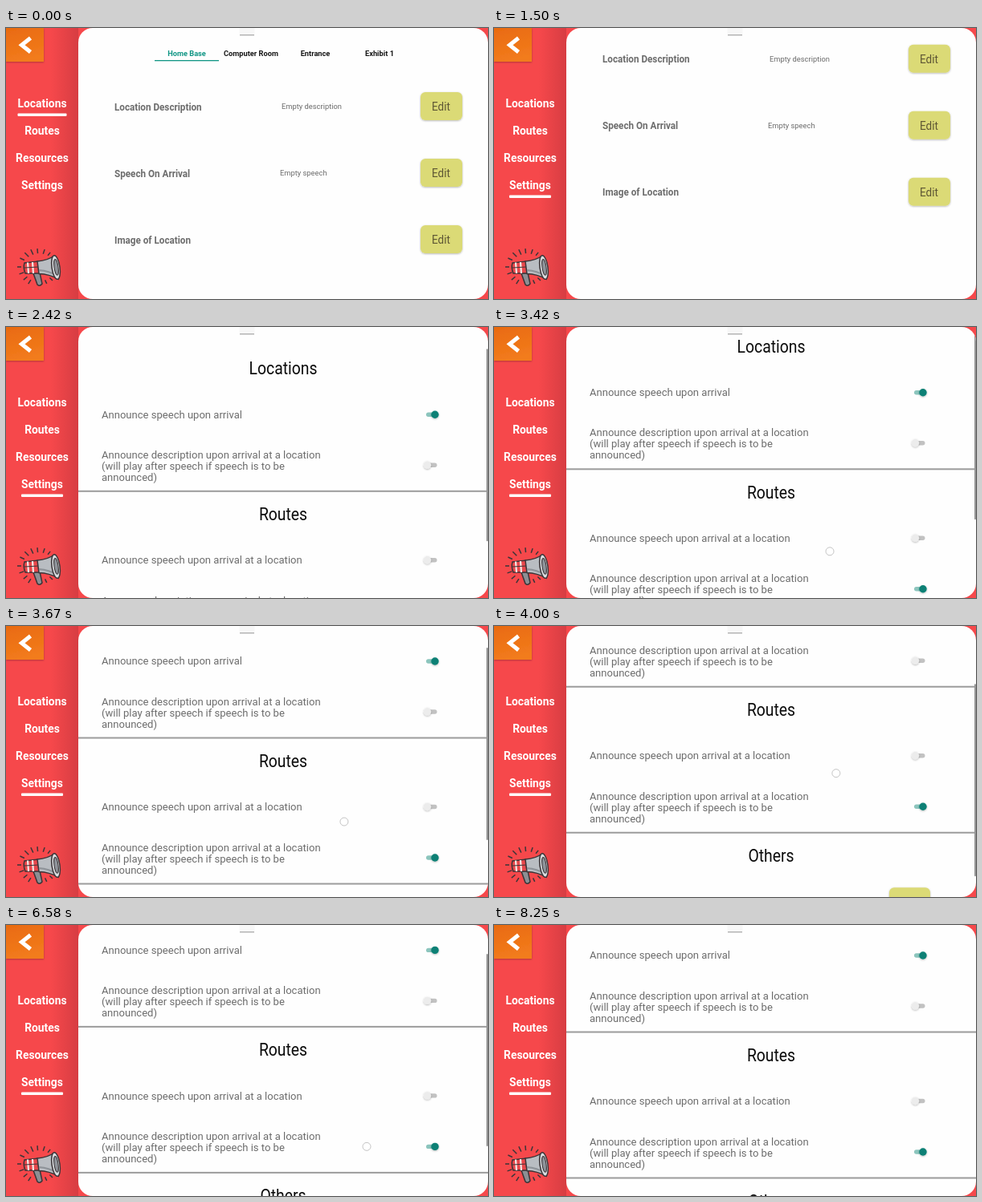
An HTML page for the animation above (8580 ms loop, 600 by 338 pixels).

```html
<!DOCTYPE html>
<html lang="en">
<head>
<meta charset="utf-8">
<title>Settings walkthrough</title>
<style>
  html, body { margin: 0; height: 100%; overflow: hidden; background: #f6484b; }
  svg { display: block; width: 100vw; height: 100vh; font-family: Roboto, sans-serif; }
  .bold { font-weight: 700; }
</style>
</head>
<body>
<svg id="stage" viewBox="0 0 600 338" preserveAspectRatio="none"></svg>
<script>
const LOOP = 8580, PAGE = 338, FPS = 12;
const GREY = '#6c6c6c', LIME = '#dbda76';

// Markup helpers
const rect = (x, y, w, h, fill, r = 0, extra = '') =>
  `<rect x="${x}" y="${y}" width="${w}" height="${h}" rx="${r}" fill="${fill}" ${extra}/>`;
const path = (d, stroke, width, fill = 'none') =>
  `<path d="${d}" stroke="${stroke}" stroke-width="${width}" fill="${fill}"/>`;
const text = (x, y, size, fill, str, extra = '') =>
  `<text x="${x}" y="${y}" font-size="${size}" fill="${fill}" ${extra}>${str}</text>`;
const narrow = (x, y, size, fill, str, extra = '') =>
  text(0, 0, size, fill, str, `transform="translate(${x} ${y}) scale(.88 1)" ${extra}`);
const mid = 'text-anchor="middle"', bold = 'class="bold"';
const lifted = 'filter="url(#lift)"';
const page = (index, body, id = '') =>
  `<g id="${id}" transform="translate(0 ${index * PAGE})">${body}</g>`;

function sidebar() {
  const labels = ['Locations', 'Routes', 'Resources', 'Settings'];
  return rect(0, 0, 600, 338, '#f6484b') + rect(0, 0, 90, 338, 'url(#shade)') +
    rect(0, 0, 47, 42, 'url(#orange)', 0, lifted) +
    path('M30.5 12.5 19.5 21.3 30.5 30', '#fff', 5) +
    labels.map((s, i) => text(45, 98.5 + 34 * i, 13.85, '#fff', s, mid + bold)).join('') +
    rect(14.5, 106.6, 61, 3.4, '#fff', 1, 'id="underline"') + megaphone();
}

function megaphone() {
  const ink = '#3b3538';
  const rays = [[-155, 20, 26], [-135, 18, 25], [-115, 17, 24], [-95, 17, 23], [-72, 17, 23], [-52, 18, 23],
    [180, 22, 27], [160, 20, 26], [140, 19, 25], [122, 19, 25], [45, 19, 24], [65, 18, 23]];
  const ray = ([deg, from, to]) => {
    const c = Math.cos(deg * Math.PI / 180), s = Math.sin(deg * Math.PI / 180);
    return `M${41 + from * c} ${298 + from * s}L${41 + to * c} ${298 + to * s}`;
  };
  return path(rays.map(ray).join(''), ink, 1.5) +
    path('M34 306 39 320Q42 323 45 319L42 305Z', ink, 1.5, '#8c8f94') +
    path('M23 293Q21 299 24 306L41 306 40 291Z', ink, 1.5, '#e8484c') +
    path('M27 292.5 28 306M33 292 34 306', '#f3e9e6', 2.2) +
    path('M23 299 40 298', ink, 1) +
    path('M39 291Q52 290 60 284L65 313Q54 307 41 306.500Z', ink, 1.5, '#b9bdc2') +
    path('M41 302Q54 303 63 309', '#8d9298', 2) +
    `<g transform="rotate(-8 62 298.500)" stroke="${ink}" stroke-width="1.500">
      <ellipse cx="62" cy="298.500" rx="5" ry="15" fill="#d9dcdf"/>
      <ellipse cx="62.500" cy="298.500" rx="2.500" ry="10" fill="#8f949a" stroke-width="1"/></g>`;
}

function locations() {
  const tabs = ['Home Base', 'Computer Room', 'Entrance', 'Exhibit 1'];
  const rows = ['Location Description', 'Speech On Arrival', 'Image of Location'];
  return tabs.map((s, i) => text(225 + 80 * i, 34.5, 9.25, i ? '#161616' : '#0f9584', s, mid + bold)).join('') +
    rect(185, 40, 80, 1.3, '#0f9584') +
    rows.map((s, i) => narrow(135, 102.500 + 83 * i, 13.3, GREY, s, bold) +
      rect(516, 80 + 83 * i, 52, 35, LIME, 6, lifted) +
      narrow(541.5, 103 + 83 * i, 15.4, '#5d5634', 'Edit', mid)).join('') +
    text(343, 101, 9.35, GREY, 'Empty description') + text(341, 184, 9.35, GREY, 'Empty speech');
}

function resources() {
  const pencil = `<path fill="#fff" d="M226.500 140.500V134L242.500 118.500 248.500 124.500 233 140.500ZM244 117 247 114.500Q248.500 113.500 250 114.500L253.500 118Q254.500 119.500 253.500 121L250.500 123.500Z"/>`;
  const bin = path('M380.5 118.5H408.500M389.500 118V115.500H399.500V118', '#fff', 2.8) +
    path('M384 121.500V137Q384 139.500 386.500 139.500H402.500Q405 139.500 405 137V121.500', '#fff', 2.8) +
    path('M389.500 123V136M394.500 123V136M399.500 123V136', '#fff', 2.3);
  return rect(218.5, 108.5, 87.5, 39, LIME, 6, lifted) + pencil + narrow(268, 134.3, 17.2, '#fff', 'Edit') +
    rect(373, 108.5, 103.5, 38, '#a5354b', 6, lifted) + bin + narrow(422, 134.3, 17.2, '#fff', 'Delete') +
    rect(278, 178, 134.5, 34.5, '#03d6c6', 0, lifted) +
    narrow(288, 199.7, 12.5, '#17615d', 'Add an image locally', bold + ' letter-spacing=".65"');
}

function settings() {
  const heading = (y, s) => narrow(345, y, 22, '#0c0c0c', s, mid);
  const lines = (y, ...strs) => strs.map((s, i) => text(119, y + 14 * i, 13.05, GREY, s)).join('');
  const divider = y => rect(90, y, 510, 2, '#9c9c9c');
  const toggle = (y, i) => `<g class="toggle" transform="translate(0 ${y})">` +
    rect(523, -2.7, 13.5, 5.4, '#c2c2c2', 2.7) +
    `<circle r="8.500" fill="#000" opacity="0"/><circle r="4.700" ${lifted}/></g>`;
  const description = ['Announce description upon arrival at a location',
    '(will play after speech if speech is to be', 'announced)'];
  return '<g id="list">' + heading(32, 'Locations') + lines(86.3, 'Announce speech upon arrival') +
    lines(136.5, ...description) + divider(176.5) +
    heading(214, 'Routes') + lines(268.2, 'Announce speech upon arrival at a location') +
    lines(318.5, ...description) + divider(358.5) +
    heading(396, 'Others') + rect(492, 428, 51, 34, LIME, 6, lifted) +
    [82, 145, 263.5, 327].map(toggle).join('') + '</g>' +
    rect(598, 0, 2, 240, '#979797', 1, 'id="bar"');
}

const $ = id => document.getElementById(id);
$('stage').innerHTML = `<defs>
  <linearGradient id="shade"><stop offset=".62" stop-color="#b8323a" stop-opacity="0"/>
    <stop offset="1" stop-color="#b8323a" stop-opacity=".5"/></linearGradient>
  <linearGradient id="orange" x2=".3" y2="1"><stop stop-color="#e96a10"/><stop offset="1" stop-color="#f27b1c"/></linearGradient>
  <filter id="lift" x="-20%" y="-20%" width="140%" height="150%">
    <feDropShadow dx="0" dy=".8" stdDeviation=".9" flood-opacity=".3"/></filter>
  <clipPath id="card"><rect x="90" width="510" height="338" rx="18"/></clipPath></defs>` +
  sidebar() + rect(90, 0, 510, 338, '#fefefe', 18) +
  '<g clip-path="url(#card)"><g id="pages">' +
  page(0, locations()) + page(2, resources()) + page(3, settings(), 'settings') + '</g></g>' +
  rect(290.5, -6, 19, 15, '#f7f7f7', 3) + path('M291 8.800H309', '#a9a9a9', 1.3) +
  '<circle id="touch" r="5" fill="#fff" fill-opacity=".8" stroke="#c4c4c4"/>';

// Motion helpers
const ramp = (t, a, b) => Math.min(1, Math.max(0, (t - a) / (b - a)));
const smooth = u => u * u * (3 - 2 * u);
const easeOut = u => 1 - (1 - u) * (1 - u);
const within = (t, a, b) => t >= a && t < b;
const mix = (from, to, u) => `rgb(${from.map((v, i) => Math.round(v + (to[i] - v) * u))})`;

const toggles = [...document.querySelectorAll('.toggle')];
function setToggle(group, on, ripple) {
  const [track, halo, thumb] = group.children;
  const x = 524.5 + 9.5 * on;
  track.setAttribute('fill', mix([194, 194, 194], [140, 197, 189], on));
  halo.setAttribute('cx', x);
  halo.setAttribute('opacity', ripple * .12);
  thumb.setAttribute('cx', x);
  thumb.setAttribute('fill', mix([236, 236, 236], [10, 128, 116], on));
}

// One tap switches on at `start`, a second one switches off again
function tapTwice(group, t, start) {
  const on = smooth(ramp(t, start, start + 250)) - smooth(ramp(t, start + 600, start + 900));
  const pulse = at => Math.sin(Math.PI * ramp(t, at, at + 400));
  setToggle(group, on, Math.max(pulse(start), pulse(start + 500)));
}

function touchAt(t, drag, pull) {
  if (within(t, 3245, 4165)) return [418 + 8 * drag, 280 - 98 * drag];
  if (within(t, 5080, 5330) || within(t, 5660, 5830)) return [527, 165];
  if (within(t, 6330, 6665)) return [449, 223 + 60 * pull];
  if (within(t, 7245, 7415) || within(t, 7660, 7830)) return [527, 103];
}

function draw(now) {
  let t = Math.floor((now % LOOP + 4) * FPS / 1000) * 1000 / FPS;
  if (within(t, 1499, 1660)) t = 1500;

  const moved = t > 1499;
  const jump = moved ? 2 * ramp(t, 1460, 1917) + easeOut(ramp(t, 1917, 2615)) : 0;
  $('pages').setAttribute('transform', `translate(0 ${-jump * PAGE})`);
  const line = moved ? [19, 208.6, 52] : [14.5, 106.6, 61];
  ['x', 'y', 'width'].forEach((name, i) => $('underline').setAttribute(name, line[i]));

  const drag = smooth(ramp(t, 3400, 4050)), pull = easeOut(ramp(t, 6250, 6750));
  const scroll = 103.5 * drag - 59.5 * pull;
  $('list').setAttribute('transform', `translate(0 ${-scroll})`);
  $('bar').setAttribute('y', scroll * .71);
  $('bar').setAttribute('opacity', t < 6300 ? 1 - ramp(t, 4500, 4750) : 1 - ramp(t, 7170, 7420));

  setToggle(toggles[0], 1, 0);
  tapTwice(toggles[1], t, 7180);
  tapTwice(toggles[2], t, 5180);
  setToggle(toggles[3], 1, 0);

  const touch = touchAt(t, drag, pull);
  $('touch').setAttribute('visibility', touch ? 'visible' : 'hidden');
  if (touch) $('touch').setAttribute('transform', `translate(${touch})`);
  requestAnimationFrame(draw);
}
requestAnimationFrame(draw);
</script>
</body>
</html>
```
